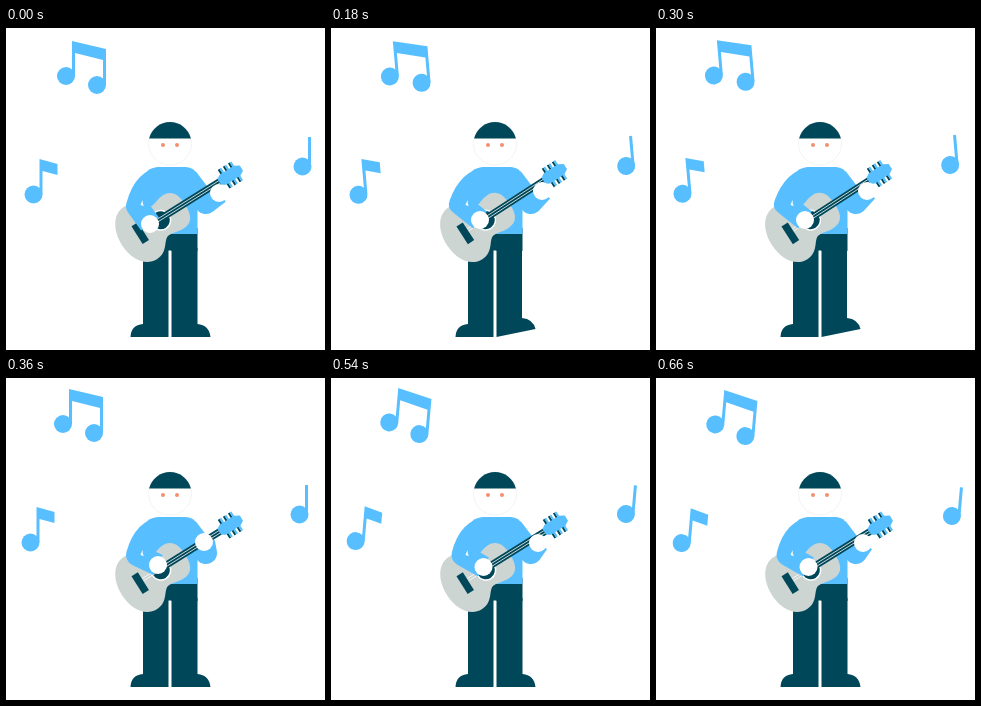
An HTML page for the animation above (0.72 s loop, 319 by 322 pixels).

```html
<!DOCTYPE html>
<html lang="en">
<head>
<meta charset="utf-8">
<title>Guitar player</title>
<style>
  html, body { margin: 0; height: 100%; overflow: hidden; background: #fff; }
  svg { display: block; width: 100vw; height: 100vh; }
  .blue { fill: #57bfff; }
  .dark { fill: #004859; }
  .white { fill: #fff; }
  .sleeve { fill: none; stroke: #57bfff; stroke-width: 22; stroke-linejoin: round; }
</style>
</head>
<body>
<svg viewBox="0 0 319 322">
  <g class="blue">
    <g class="note" data-pivot="78 50">
      <path d="M66 13L100 21V57H97V32L69 25V48H66Z"/>
      <circle cx="60" cy="48" r="9"/><circle cx="91" cy="57" r="9"/>
    </g>
    <g class="note" data-pivot="43 156">
      <path d="M33.5 131L51.5 136V147L36.5 143V166H33.5Z"/>
      <circle cx="27.5" cy="166.5" r="9"/>
    </g>
    <g class="note" data-pivot="302 143">
      <path d="M302 109H305V138H302Z"/>
      <circle cx="296.5" cy="138.5" r="9"/>
    </g>
  </g>

  <g class="dark">
    <path d="M137 200H191.500V223H165.500V222.500H162.500V309H124.500Q125 297 137 296Z"/>
    <path id="rightLeg"/>
  </g>
  <path class="blue" d="M152 139H180Q191.500 140 191.500 152V206H137V152Q139 140 152 139Z"/>

  <circle cx="164" cy="115.5" r="21.5" fill="#fff" stroke="#eee" stroke-width=".7"/>
  <path class="dark" d="M143.100 110.500A21.500 21.500 0 0 1 184.900 110.500Z"/>
  <g fill="#f58f70"><circle cx="157" cy="117" r="2"/><circle cx="171" cy="117" r="2"/></g>

  <path id="fretSleeve" class="sleeve"/>
  <g id="guitar">
    <g transform="translate(154 191) rotate(-32)">
      <g transform="translate(0 1.5)">
        <path fill="#cdd5d3" d="M29 0C29 -14 24 -20 15 -20C8 -20 6 -17 -1 -17C-8 -17 -10 -31 -24 -31C-38 -31 -46 -16 -46 0C-46 16 -38 31 -24 31C-10 31 -8 17 -1 17C6 17 8 19 15 19C24 19 29 14 29 0Z"/>
        <circle class="dark" r="9.8" stroke="#fff" stroke-width="1.5"/>
        <path class="dark" d="M-28 -10.500H-20.500V10.500H-28Z"/>
      </g>
      <path class="dark" d="M0 -3.500H73V3.500H0Z"/>
      <path d="M-20 -1.300H73M-20 1.300H73" stroke="#fff" stroke-width=".7"/>
      <path d="M76 -11V11M82 -11V11M88 -11V11" stroke="#004859" stroke-width="2"/>
      <path d="M78 -11V11M84 -11V11M90 -11V11" stroke="#57bfff" stroke-width="2"/>
      <path class="blue" d="M70 -3.500L74 -6H91L96 -3V3L91 6H74L70 3.500Z"/>
    </g>
  </g>
  <path id="strumSleeve" class="sleeve"/>
  <path class="white" d="M136.500 172L134.500 177L138 178Q136.300 176 136.500 172Z"/>
  <circle id="strumHand" class="white" r="9"/>
  <circle id="fretHand" class="white" r="9"/>
</svg>
<script>
const LOOP = 720, BEAT = 180;
const FLAT_LEG = "M165.5 220H191.5V296Q203 297 204.5 309H165.5Z";
const LIFTED_LEG = "M165.5 220H191V290Q202 291 204.5 301L165.5 309Z";

const poses = [
  { strum: [144, 196], elbow: [131, 178], fret: [213, 165], tilt: 0, guitar: 0, leg: FLAT_LEG },
  { strum: [149, 192], elbow: [129, 176], fret: [211, 163], tilt: -5, guitar: -1, leg: LIFTED_LEG },
  { strum: [152, 187], elbow: [131, 177], fret: [198, 164], tilt: 0, guitar: 0, leg: FLAT_LEG },
  { strum: [152.5, 189], elbow: [131.5, 177], fret: [207, 165], tilt: 5, guitar: 0, leg: FLAT_LEG }
];

// Notes drift up-left and back in whole pixels: [start time, offset]
const driftX = [[0, 0], [90, -1], [210, -2], [330, -3], [450, -2], [630, -1]];
const driftY = [[0, 0], [120, -1], [300, -2], [570, -1], [660, 0]];
const stepAt = (steps, t) => steps.filter(([start]) => start <= t).pop()[1];

const byId = id => document.getElementById(id);
const set = (el, attrs) => Object.entries(attrs).forEach(([key, value]) => el.setAttribute(key, value));
const notes = document.querySelectorAll(".note");

function draw(now) {
  const t = now % LOOP;
  const { strum, elbow, fret, tilt, guitar, leg } = poses[Math.floor(t / BEAT)];
  for (const note of notes) {
    set(note, { transform: `translate(${stepAt(driftX, t)} ${stepAt(driftY, t)}) rotate(${tilt} ${note.dataset.pivot})` });
  }
  set(byId("rightLeg"), { d: leg });
  set(byId("guitar"), { transform: `rotate(${guitar} 146 200)` });
  set(byId("strumSleeve"), { d: `M156 150Q138 152 ${elbow}L${strum}` });
  set(byId("fretSleeve"), { d: `M181 150L200 175L${fret}` });
  set(byId("strumHand"), { cx: strum[0], cy: strum[1] });
  set(byId("fretHand"), { cx: fret[0], cy: fret[1] });
}

const start = performance.now();
function tick() {
  draw(performance.now() - start);
  requestAnimationFrame(tick);
}
tick();
</script>
</body>
</html>
```
